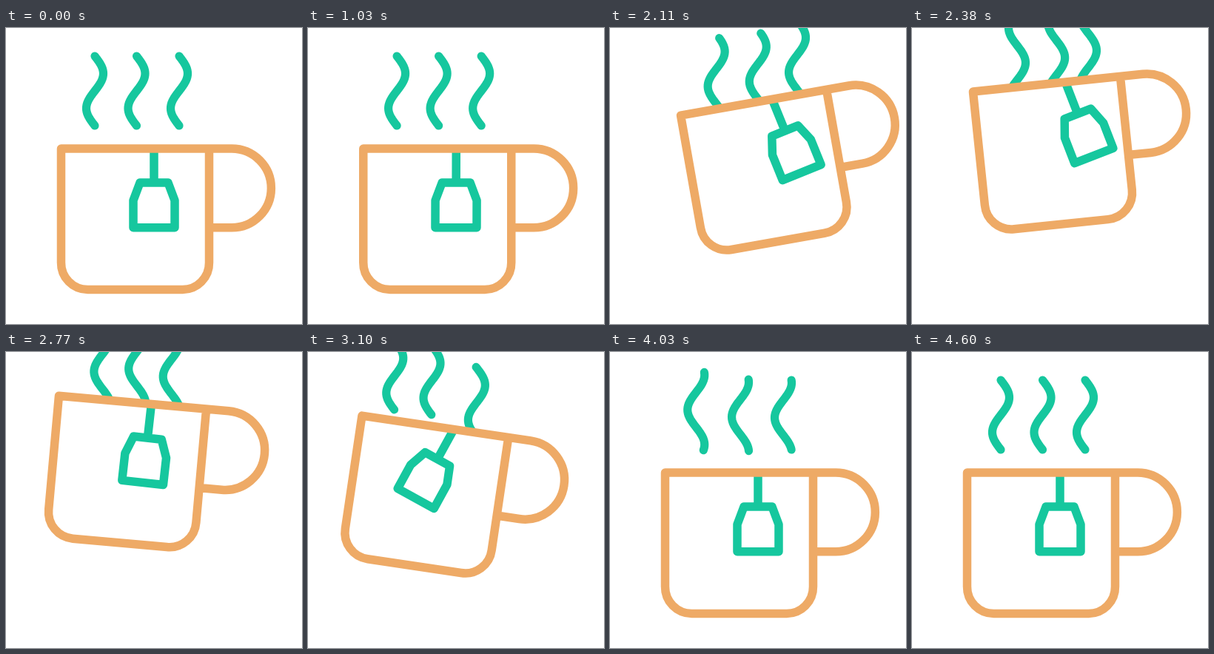
An HTML page for the animation above (4.84 s loop, 400 px wide and 400 px high).

```html
<!DOCTYPE html>
<html lang="en">
<head>
<meta charset="utf-8">
<title>Tea cup</title>
<style>
html, body { margin: 0; width: 100%; height: 100%; overflow: hidden; background: #fff; }
svg { display: block; width: 100vw; height: 100vh; }
path { fill: none; stroke-width: 11.5; stroke-linejoin: round; }
.green { stroke: #16c79e; }
.cup { stroke: #eeaa66; }
.steam { stroke-width: 11.2; stroke-linecap: round; }
#body { fill: #fff; }
</style>
</head>
<body>
<svg viewBox="0 0 400 400">
  <path class="green steam"/>
  <path class="green steam"/>
  <path class="green steam"/>
  <g class="pose"><path id="body" d="M74.5 163V317a36 36 0 0 0 36 36.5H238a36 36 0 0 0 36.5-36.5V163Z"/></g>
  <g id="bag">
    <path class="green" d="M200 163V209M181 209H219L228 233V269.7H172V233Z"/>
  </g>
  <g class="pose">
    <path class="cup" d="M274.5 163V317a36 36 0 0 1-36.5 36.5H110.5a36 36 0 0 1-36-36.5V163H305a53.4 53.4 0 0 1 0 106.8H274.5"/>
  </g>
</svg>
<script>
const LOOP = 4840, START = 1030, END = 4600, STEP = 30;
const MOVE_START = 1000, MOVE_SPAN = 2800, KEY_GAP = 400;
const PIVOT = '216.5 258';
const WAVE = 94, SWAY = 11.5, TOP = 38, TURNS = 3;

// Smooth curve through evenly spaced keys, resting at zero before and after
function keyed(...keys) {
  const at = i => keys[i - 1] || 0;
  const slope = i => i < 1 || i > keys.length ? 0 : (at(i + 1) - at(i - 1)) / 2;
  return t => {
    const k = Math.max(0, (t - MOVE_START) / KEY_GAP);
    const i = Math.floor(k), u = k - i, v = 1 - u;
    return v * v * (1 + 2 * u) * at(i) + u * u * (3 - 2 * u) * at(i + 1)
      + u * v * (v * slope(i) - u * slope(i + 1));
  };
}

const cupX = keyed(23, 39, 31.5, -2.5, -18.5, -5);
const cupY = keyed(-5, -38, -79, -99, -70, -15);
const cupTurn = keyed(-0.8, -6, -9.9, 0.8, 8.9, 3.4);
const bagTurn = keyed(8.5, -6, -24, -10, 27, 20.5, -2, 3);

// Each strand repeats the cup's move, smaller and over its own span
const strands = [
  { x: 120, span: 3600, extra: 27 },
  { x: 176.5, span: 3200, extra: 6 },
  { x: 234, span: 2600, extra: 0 }
];
const steamPaths = document.querySelectorAll('.steam');
const poses = document.querySelectorAll('.pose');
const bag = document.getElementById('bag');

function phase(t) {
  const u = Math.max(0, (t - START) / (END - START));
  return 2 * Math.PI * TURNS * (1 - (1 - u ** 1.35) ** 1.7);
}

// Late strands lengthen for a moment as the cup comes down
function stretch(t) {
  const u = (t - 3100) / 1200;
  return u > 0 && u < 1 ? Math.sin(Math.PI * u) ** 2 : 0;
}

function drawSteam(s, path, t) {
  const clock = MOVE_START + (t - MOVE_START) * MOVE_SPAN / s.span;
  const cx = s.x + 0.6 * cupX(clock), top = TOP + 0.55 * cupY(clock);
  const length = WAVE + s.extra * stretch(t);
  const points = [];
  for (let i = 0; i <= 40; i++) {
    const d = length * i / 40;
    const x = cx + SWAY * Math.sin(2 * Math.PI * d / WAVE - phase(t));
    points.push(x.toFixed(2) + ' ' + (top + d).toFixed(2));
  }
  path.setAttribute('d', 'M' + points.join('L'));
}

function draw(time) {
  const t = time < START ? 0
    : Math.min(END, START + Math.floor((time - START) / STEP) * STEP);
  const turn = cupTurn(t);
  const place = `translate(${cupX(t)} ${cupY(t)}) rotate(${turn} ${PIVOT})`;
  poses.forEach(p => p.setAttribute('transform', place));
  // The bag hangs from the rim but swings on its own
  bag.setAttribute('transform', `${place} rotate(${bagTurn(t) - turn} 200 163)`);
  strands.forEach((s, i) => drawSteam(s, steamPaths[i], t));
}

let origin = null;
function tick(now) {
  if (origin === null) origin = now;
  draw((now - origin) % LOOP);
  requestAnimationFrame(tick);
}
draw(0);
requestAnimationFrame(tick);
</script>
</body>
</html>
```
